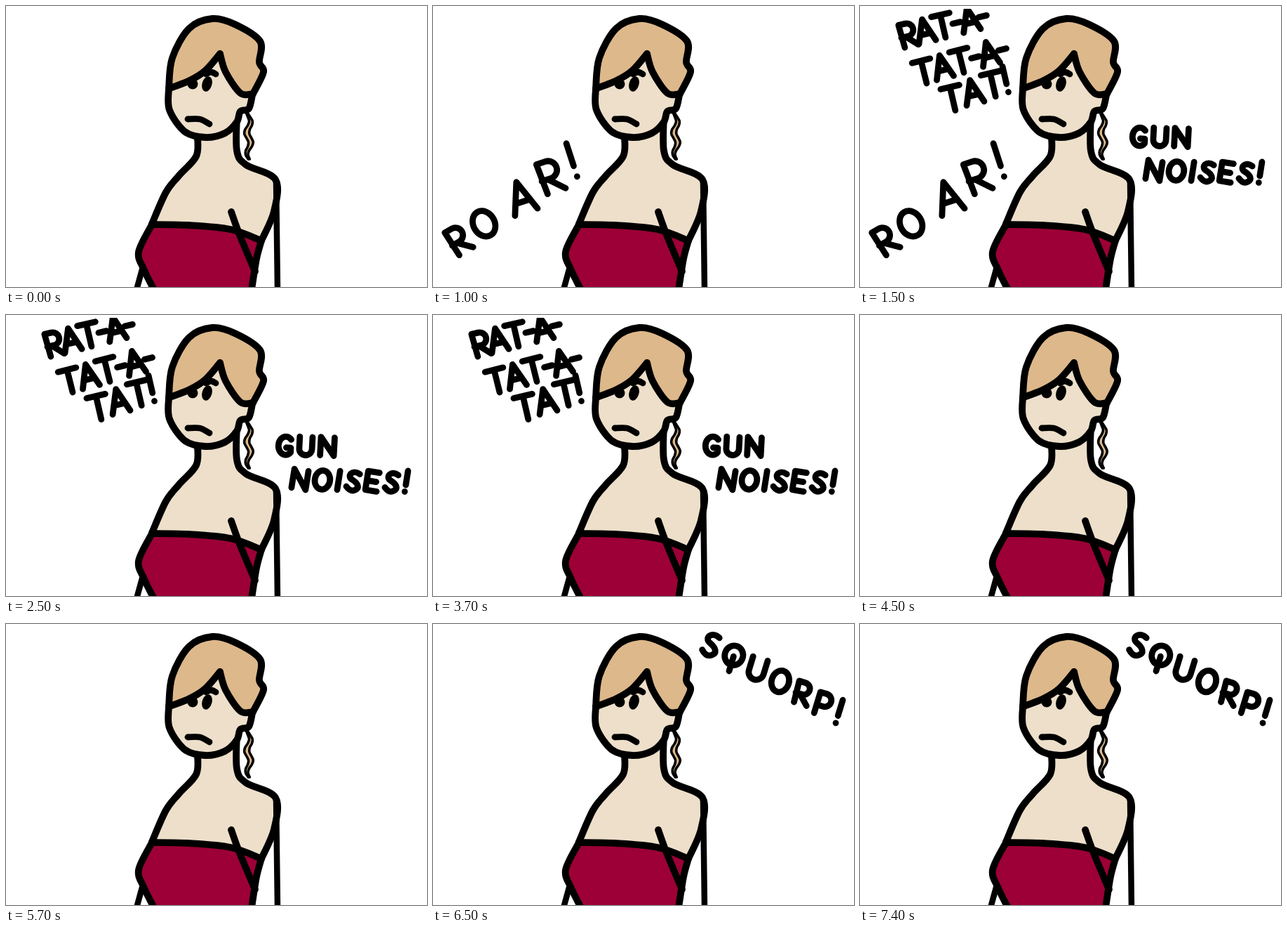
These frames come from a looping animation (600x400 px, 8 s). An HTML page:

```html
<!DOCTYPE html>
<html lang="en">
<head>
<meta charset="utf-8">
<title>Noises</title>
<style>
  html, body { margin: 0; width: 100%; height: 100%; overflow: hidden; background: #fff; }
  svg { display: block; width: 100vw; height: 100vh; }
  path { fill: none; stroke: #000; stroke-linecap: round; stroke-linejoin: round; }
</style>
</head>
<body>
<svg id="stage" viewBox="0 0 600 400">
  <clipPath id="page"><rect x="0" y="4" width="600" height="396"/></clipPath>
</svg>
<script>
const LOOP = 8000;
const SKIN = '#eddfca', HAIR = '#ddb88b', DRESS = '#9c0037';
const INK = 9.8, PEN = 8.8;
const stage = document.getElementById('stage');

function add(parent, tag, attrs) {
  const el = document.createElementNS('http://www.w3.org/2000/svg', tag);
  for (const key in attrs) el.setAttribute(key, attrs[key]);
  return parent.appendChild(el);
}

const group = label => add(stage, 'g', { role: 'img', 'aria-label': label, 'clip-path': 'url(#page)' });
const points = text => text.split(' ').map(pair => pair.split(',').map(Number));
const reversed = list => [...list].reverse();

// Smooth path through a list of points.
function curve(p) {
  let d = 'M' + p[0];
  for (let i = 1; i < p.length; i++) {
    const before = p[i - 2] || p[i - 1], from = p[i - 1], to = p[i], after = p[i + 1] || to;
    const out = from.map((v, k) => v + (to[k] - before[k]) / 6);
    const into = to.map((v, k) => v - (after[k] - from[k]) / 6);
    d += 'C' + [out, into, to];
  }
  return d;
}

function line(parent, p, width = INK) {
  add(parent, 'path', { d: curve(p), style: `stroke-width:${width}px` });
}

// Fills the region enclosed by several contours joined end to end.
function area(parent, color, ...contours) {
  const d = contours.map(curve).join('').replace(/(?!^)M/g, 'L');
  add(parent, 'path', { d, style: `fill:${color};stroke:none` });
}

function drawBraid(g) {
  const left = [], right = [];
  for (let y = 152; y <= 218; y += 6) {
    const middle = 346 + 3 * Math.cos((y - 165) * Math.PI / 15);
    const half = 1 + 2.6 * Math.sin((y - 152) / 66 * Math.PI);
    left.push([middle - half, y]);
    right.push([middle + half, y]);
  }
  area(g, HAIR, left, reversed(right));
  line(g, left, 3.6);
  line(g, right, 3.6);
}

function drawWoman() {
  const g = group('Frowning woman in a red dress');
  const leftSide = points('273,186 271,214 246,242 228,265 208,310');
  const rightSide = points('329,156 329,206 342,226 384,247 382,292 364,334');
  const neckline = points('208,311 260,312 320,318 364,334');
  const dressLeft = points('208,311 189,350 197,376 211,404');
  const dressRight = points('364,334 357,360 350,404');
  const strap = points('321,293 333,326 355,378');
  const face = points('232,117 233,148 255,179 284,187 312,181 329,165 334,150 346,146 351,127');
  const crown = points('232,117 237,74 261,32 294,18 326,26 362,50 361,80 367,94 352,125');
  const fringe = points('352,125 334,124 313,94 305,68');
  const parting = points('305,68 284,92 262,106 234,117');

  drawBraid(g);
  area(g, SKIN, leftSide, neckline, reversed(rightSide));
  area(g, DRESS, neckline, dressRight, reversed(dressLeft));
  [leftSide, rightSide, neckline, dressLeft, dressRight, strap].forEach(p => line(g, p));
  line(g, points('385,250 387,404'), 8.5);
  line(g, points('194,375 186,404'), 8.5);

  area(g, SKIN, face, fringe, parting);
  area(g, HAIR, crown, fringe, parting);
  [face, crown, fringe, parting].forEach(p => line(g, p));

  add(g, 'circle', { cx: 266, cy: 111, r: 7.5 });
  add(g, 'ellipse', { cx: 286.5, cy: 111, rx: 7, ry: 11, transform: 'rotate(17 286.5 111)' });
  line(g, points('285,97 292,94 299,97'), PEN);
  line(g, points('259,161 276,161 290,168'), PEN);
}

// Pen strokes of the hand lettering: [width, path], ten units high.
const GLYPHS = {
  R: [6.5, 'M.5 10L0 0H3A2.8 2.8 0 0 1 3 5.6H0M2 5.6L6.5 10'],
  O: [8, 'M4 0A4 5 0 1 1 4 10A4 5 0 1 1 4 0'],
  A: [7.5, 'M0 10L3.7 0L7.5 10M1.3 6.5H6.2'],
  T: [8, 'M0 0H8M4 0V10'],
  G: [7, 'M7 1.5A4 5 0 1 0 7 8.5V6H4.5'],
  U: [7, 'M0 0V6.5A3.5 3.5 0 0 0 7 6.5V0'],
  N: [7.5, 'M0 10V0L7.5 10V0'],
  I: [1, 'M.5 0V10'],
  S: [6.2, 'M6 1C2-1.2-1 3 2.5 4.5S7 8 5 9.5S1.5 10 0 8.5'],
  E: [6, 'M6 0H0V10H6M0 5H5'],
  Q: [8.5, 'M4.2 0A4.2 4.5 0 1 1 4.2 9A4.2 4.5 0 1 1 4.2 0M4.2 5V12'],
  P: [6, 'M0 10V0H3A3 3 0 0 1 3 6H0'],
  '!': [1, 'M.5-1V6.5M.5 10v.01'],
  '-': [3.5, 'M0 5H3.5']
};

// Letters sit on a line through the first one's centre (x, y), each turned by tilt.
function letter(parent, { text, x, y, slope, tilt, size, gap }) {
  const scale = size / 10, angle = slope * Math.PI / 180;
  let along = -GLYPHS[text[0]][0] * scale / 2;
  for (const char of text) {
    const [width, d] = GLYPHS[char];
    const at = along + width * scale / 2;
    const cx = x + at * Math.cos(angle), cy = y + at * Math.sin(angle);
    add(parent, 'path', {
      d, style: `stroke-width:${PEN / scale}px`,
      transform: `translate(${cx} ${cy}) rotate(${tilt}) scale(${scale}) translate(${-width / 2} -5)`
    });
    along += width * scale + gap;
  }
}

function showBetween(el, from, to) {
  const step = (time, opacity) => ({ offset: time / LOOP, opacity, easing: 'step-end' });
  const last = to < LOOP ? [step(to, 0), step(LOOP, 0)] : [step(LOOP, 1)];
  el.animate([step(0, 0), step(from, 1), ...last], { duration: LOOP, iterations: Infinity });
}

const noises = [
  { label: 'ROAR!', from: 1000, to: 2500, rows: [
    { text: 'RO', x: 37, y: 333, slope: -33, tilt: -30, size: 38, gap: 15 },
    { text: 'AR!', x: 126, y: 272, slope: -35, tilt: -18, size: 45, gap: 20 }
  ] },
  { label: 'RAT-A-TAT-A-TAT!', from: 1500, to: 4500, rows: [
    { text: 'RAT-A-', x: 69, y: 41, slope: -14, tilt: -13, size: 33, gap: 1 },
    { text: 'TAT-A-', x: 91, y: 94, slope: -16, tilt: -14, size: 33, gap: 2 },
    { text: 'TAT!', x: 132, y: 132, slope: -19, tilt: -13, size: 34, gap: 4 }
  ] },
  { label: 'GUN NOISES!', from: 1500, to: 4500, rows: [
    { text: 'GUN', x: 397, y: 186, slope: 1, tilt: 3, size: 26, gap: 12 },
    { text: 'NOISES!', x: 419, y: 234, slope: 1.5, tilt: 9, size: 27, gap: 11 }
  ] },
  { label: 'SQUORP!', from: 6500, to: LOOP, rows: [
    { text: 'SQUORP!', x: 396, y: 29, slope: 28, tilt: 17, size: 31, gap: 14 }
  ] }
];

drawWoman();
for (const { label, from, to, rows } of noises) {
  const g = group(label);
  rows.forEach(row => letter(g, row));
  showBetween(g, from, to);
}
</script>
</body>
</html>
```
